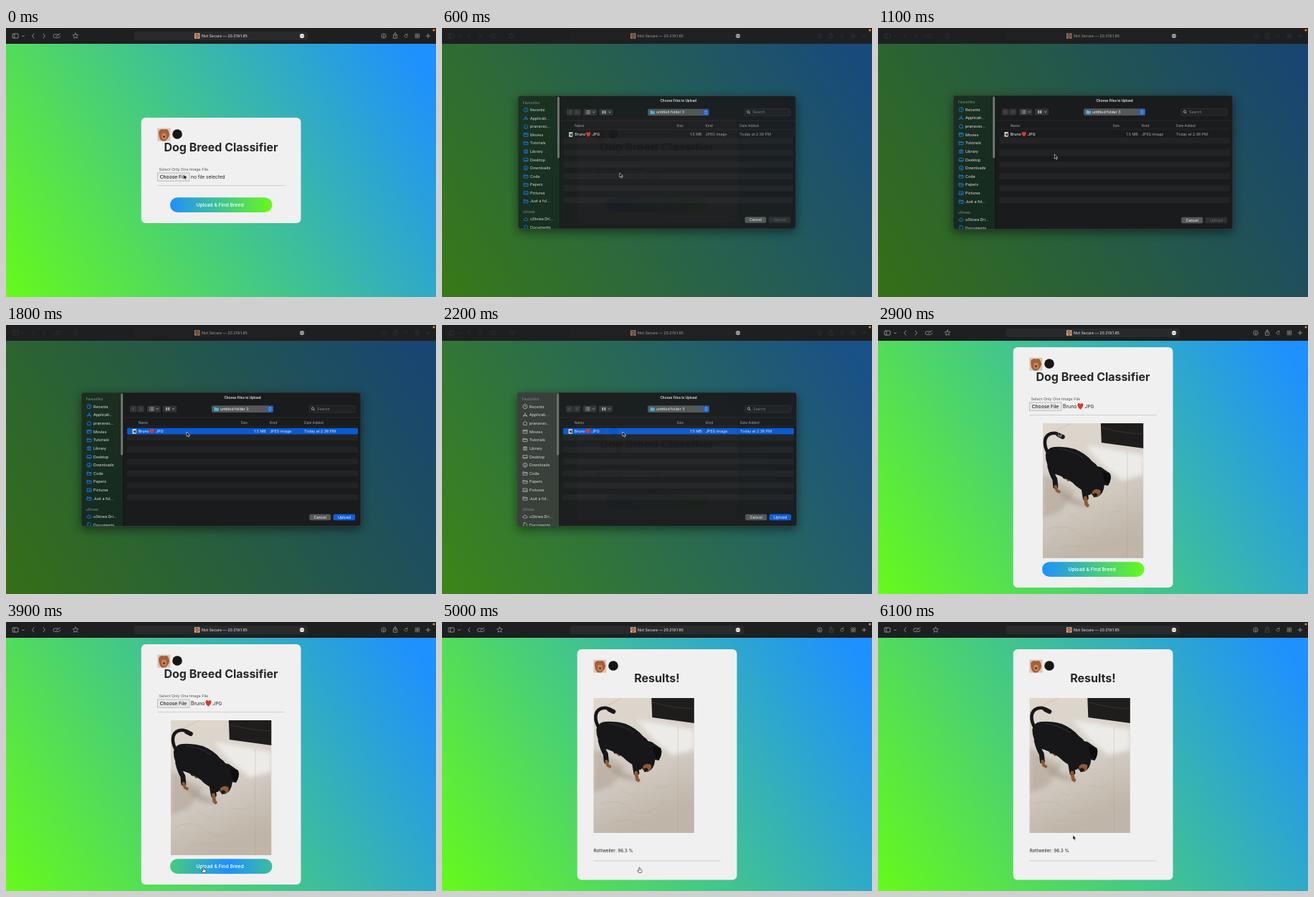
An HTML page that plays this animation: 600x375 px, repeating every 6200 ms.

```html
<!DOCTYPE html>
<html lang="en">
<head>
<meta charset="utf-8">
<title>Dog Breed Classifier</title>
<style>
html, body { margin: 0; width: 100%; height: 100%; overflow: hidden; background: #1e1f20; }
svg { display: block; width: 100vw; height: 100vh; }
text { font-family: Inter, "Open Sans", sans-serif; white-space: pre; }
</style>
</head>
<body>
<svg id="stage" viewBox="0 0 600 375"></svg>
<script>
const LOOP = 6200;
const BLUE = '#1e90ff', LIME = '#66fa1a', INK = '#262626';

const txt = (x, y, s, size, fill = '#fff', weight = 400, anchor = 'start') =>
  `<text x="${x}" y="${y}" font-size="${size}" fill="${fill}" font-weight="${weight}" text-anchor="${anchor}">${s}</text>`;
const box = (x, y, w, h, fill, r = 0, more = '') =>
  `<rect x="${x}" y="${y}" width="${w}" height="${h}" rx="${r}" fill="${fill}" ${more}/>`;
const line = (d, color, w = 0.8, more = '') =>
  `<path d="${d}" fill="none" stroke="${color}" stroke-width="${w}" stroke-linecap="round" stroke-linejoin="round" ${more}/>`;
const shape = (d, fill, more = '') => `<path d="${d}" fill="${fill}" ${more}/>`;
const heart = (x, y, k) =>
  shape('M0 4C-5 0-4-4-1.8-4Q-.4-4 0-2.6Q.4-4 1.8-4C4-4 5 0 0 4Z', '#d9392b', `transform="translate(${x} ${y}) scale(${k})"`);
const group = (id, inner, more = '') => `<g id="${id}" ${more}>${inner}</g>`;

// end points of a CSS-style angled gradient over the page area
function skyLine(deg) {
  const a = deg * Math.PI / 180, sx = Math.sin(a), sy = Math.cos(a), half = 300 * sx + 176.5 * sy;
  return `x1="${300 - sx * half}" y1="${198.5 + sy * half}" x2="${300 + sx * half}" y2="${198.5 - sy * half}"`;
}

const defs = `<defs>
  <linearGradient id="sky" gradientUnits="userSpaceOnUse" ${skyLine(58)}><stop stop-color="${LIME}"/><stop offset=".96" stop-color="${BLUE}"/></linearGradient>
  <linearGradient id="btn" gradientUnits="userSpaceOnUse" x1="229" x2="371" y1="0" y2="0" spreadMethod="reflect">
    <stop stop-color="${BLUE}"/><stop offset="1" stop-color="${LIME}"/></linearGradient>
  <linearGradient id="floor" x1="0" y1="0" x2=".3" y2="1">
    <stop stop-color="#dfd6ca"/><stop offset=".35" stop-color="#d9d4cc"/><stop offset=".65" stop-color="#d0c9c0"/><stop offset="1" stop-color="#bfb5a8"/></linearGradient>
  <linearGradient id="side" x1="0" y1="0" x2="0" y2="1"><stop stop-color="#1a2f20"/><stop offset="1" stop-color="#162b20"/></linearGradient>
  <filter id="soft" x="-30%" y="-30%" width="160%" height="160%"><feGaussianBlur stdDeviation="3"/></filter>
  <filter id="shade" x="-20%" y="-20%" width="140%" height="150%"><feGaussianBlur stdDeviation="7"/></filter>
  <clipPath id="frame"><rect width="140.5" height="188"/></clipPath>
  <clipPath id="sheet"><rect x="105" y="94" width="390" height="186.5" rx="4"/></clipPath>
  <g id="pup">${box(0, 0, 18, 18, '#d8c7b8')}${shape('M2 4Q5 0 9 2Q15 0 16 6Q18 11 14 15L11 18H6Q1 14 2 4Z', '#a65f38')}
    ${shape('M6 8Q9 6 12 8L13 14Q9 18 6 14Z', '#c68659')}<circle cx="9.3" cy="12" r="1.4" fill="#47291d"/></g>
  <g id="photo" clip-path="url(#frame)">${photo()}</g>
</defs>`;

function photo() {
  const tan = '#8f5a38', coat = '#17171a';
  return box(0, 0, 141, 188, 'url(#floor)')
    + shape('M0 70L45 95L26 122L0 132Z', '#a99a8a', 'opacity=".5" filter="url(#soft)"')
    + shape('M60 30L141 44V72L110 80L84 58Z', '#f1f0ee', 'opacity=".85" filter="url(#soft)"')
    + line('M0 20L40 0M118 40V188', '#a9a196', 0.6, 'opacity=".6"')
    + line('M8 148Q32 138 50 154T98 146M22 176Q52 164 74 178M84 122Q102 128 112 118M38 128L56 136', '#b0a79b', 0.6, 'opacity=".6"')
    + shape('M81 0H141V35L82 27Z', '#1f1c1c') + line('M83 6Q110 14 141 15', '#393433', 1)
    + shape('M18 92Q42 104 62 112L66 117L40 112Z', '#827567', 'opacity=".4" filter="url(#soft)"')
    + line('M8 42C1 31 1 18 11 14.5Q19 12 26 18', coat, 4.6) + line('M22 16L28 19', coat, 6)
    + line('M10 60Q13 72 17 78L18 88M25 64L31 74', coat, 7)
    + line('M18 88L20 94L23 95.5M32 75L36 79', tan, 4)
    + shape('M4 44Q6 34 16 33Q32 32 45 36Q60 42 69 53Q80 60 80 72Q74 88 62 97Q48 90 42 83Q30 74 14 70Q4 58 4 44Z', coat)
    + line('M57 86L60 104M67 84L64 96', coat, 8)
    + line('M59.5 104L61 113L62.5 114.5', tan, 4.8)
    + shape('M63 68Q70 58 81 61L94 70Q97 77 91 87L86 86Q85 99 76 103Q69 103 67 96Q60 82 63 68Z', coat)
    + shape('M69 95Q75 89 81 94Q81 102 75 103Q69 103 69 95Z', tan)
    + shape('M70 99Q74 95 77 100Q74 104 71 103Z', '#1e1718')
    + shape('M83 67L94 70Q97 78 91 87Q84 80 83 67Z', '#0d0d10')
    + line('M22 36Q40 37 56 48', '#303035', 1.4, 'opacity=".7"');
}

function browserBar() {
  const c = '#a6a6a8';
  const icons = box(9, 8, 8, 6, 'none', 1, `stroke="${c}" stroke-width=".8"`) + line('M11.8 8V14M22.5 10.5L24 12L25.5 10.5M39 8L36.5 11L39 14', c)
    + group('fwd', line('M52 8L54.5 11L52 14', c))
    + group('tools', line('M73 9H67.5Q66 9 66 11T67.5 13.5H73.5Q75 13.5 75.3 11M70 11.8L75.5 7.8', c, 0.7)
      + line('M97 7L98.1 9.5L100.8 9.8L98.8 11.6L99.4 14.3L97 12.9L94.6 14.3L95.2 11.6L93.2 9.8L95.9 9.5Z', c, 0.7))
    + `<circle cx="527" cy="11" r="3.2" fill="none" stroke="${c}" stroke-width=".7"/>` + line('M527 9.4V12.6M525.8 11.6L527 12.7L528.2 11.6', c, 0.6)
    + group('share', line('M542 9.5H540.5V14.3H545.7V9.5H544.3M543.1 12V6.8M541.6 8.2L543.1 6.8L544.6 8.2', c, 0.7))
    + line('M559.8 9.5A2.2 2.2 0 1 0 560.4 11.4M560 8V9.6H558.4', c, 0.6)
    + [[571, 8], [574.3, 8], [571, 11.3], [574.3, 11.3]].map(p => box(p[0], p[1], 2.5, 2.5, 'none', 0.4, `stroke="${c}" stroke-width=".6"`)).join('')
    + line('M586.3 11H591.7M589 8.3V13.7', c);
  return box(0, 0, 600, 22, '#1e1f20') + group('pill', box(179, 5, 242, 12, '#292a2c', 3))
    + group('icons', icons)
    + group('address', '<use href="#pup" transform="translate(263 7.3) scale(.41)"/>' + txt(273, 13.1, 'Not Secure — 20.219.1.85', 5.3, '#eee')
      + '<circle cx="413" cy="11" r="3.1" fill="#eee"/>' + line('M411.5 11H411.51M413 11H413.01M414.5 11H414.51', '#222', 0.9))
    + '<circle cx="597" cy="3" r="1.6" fill="#f08a24"/>';
}

function page() {
  const head = '<use href="#pup" x="211.3" y="139.6"/><circle cx="239" cy="148" r="6.8" fill="#161616"/>';
  const rule = y => line(`M211.5 ${y}H388.5`, '#b8b8b8', 0.6);
  const form = txt(213.5, 199.4, 'Select Only One Image File', 5.4, '#555')
    + box(211.5, 202, 44.5, 11.2, '#e9e9e9', 0, 'stroke="#a8a8a8" stroke-width=".7"')
    + txt(214.7, 209.8, 'Choose File', 6.7, '#222', 500)
    + group('none', txt(258, 209.8, 'no file selected', 6.6, '#222'))
    + group('picked', txt(258, 209.8, 'Bruno', 6.9, '#222') + heart(282.4, 207.3, 1.1) + txt(287, 209.8, '.JPG', 6.4, '#222'))
    + rule(219.6);
  return '<rect id="card" x="188.7" width="222.8" rx="6" fill="#f0f0f0"/>'
    + group('head', head + group('title', txt(300, 172, 'Dog Breed Classifier', 15.95, INK, 700, 'middle') + form)
      + group('results', txt(300, 171.3, 'Results!', 16, INK, 700, 'middle')))
    + '<use id="shot" href="#photo"/>'
    + group('button', box(229, 236.3, 142.4, 20.8, 'url(#btn)', 10.4) + txt(298.5, 249, 'Upload &amp; Find Breed', 6.8, '#fff', 500, 'middle'))
    + group('verdict', txt(211.5, 321, 'Rottweiler: 96.3 %', 6.4, '#222') + rule(333));
}

const glyphs = {
  clock: 'M3 0A3 3 0 1 1-3 0A3 3 0 1 1 3 0M0-1.7V0L1.3 .8',
  app: 'M-2.6 2.5L.3-2.7M-.3-2.7L2.6 2.5M-3 1H3',
  home: 'M-3 0L0-2.8L3 0M-2.2-.6V2.6H2.2V-.6',
  film: 'M-3-2.2H3V2.3H-3ZM-3-.7H3M-1-2.2L-1.6-.7M1-2.2L.4-.7',
  folder: 'M-3-2.1H-.8L-.1-1.4H3V2.3H-3ZM-3-.6H3',
  temple: 'M-3-1L0-2.8L3-1ZM-2-.8V2M0-.8V2M2-.8V2M-3 2.4H3',
  screen: 'M-3-2H3V2.2H-3ZM-3 1.2H3',
  down: 'M3 0A3 3 0 1 1-3 0A3 3 0 1 1 3 0M0-1.5V1.5M-1.2 .4L0 1.6L1.2 .4',
  photo: 'M-3-2.2H3V2.2H-3ZM-2.5 1.8L-.5-.4L.8 .8L1.6 0L2.7 1.8',
  cloud: 'M-1.8 2H2Q3.3 1.6 3 .3Q2.6-.7 1.5-.5Q1-2.4-.7-2Q-2-1.6-1.9-.3Q-3.3-.1-3.1 1Q-2.8 2-1.8 2Z',
  doc: 'M-2-2.9H.8L2.2-1.5V2.9H-2Z'
};

function dialog() {
  const places = [['clock', 'Recents'], ['app', 'Applicati...'], ['home', 'pranavso...'], ['film', 'Movies'], ['folder', 'Tutorials'],
    ['temple', 'Library'], ['screen', 'Desktop'], ['down', 'Downloads'], ['folder', 'Code'], ['folder', 'Papers'],
    ['photo', 'Pictures'], ['folder', 'Just a fol...']].map((p, i) => [...p, 113.7 + i * 11.65]);
  places.push(['cloud', 'uStowa Dri...', 267], ['doc', 'Documents', 278.6]);
  const marks = places.map(p => `<path transform="translate(116 ${p[2]})" d="${glyphs[p[0]]}"/>`).join('');
  const names = places.map(p => txt(122, p[2] + 1.9, p[1], 5.4, '#e6e6e6')).join('');
  const stripes = [...Array(6)].map((_, i) => box(169, 153 + i * 16.6, 322, 8.3, '#222325', 1.5)).join('');
  const grey = '#a6a6a8', pale = '#dcdcdc';
  const panel = box(105, 94, 390, 187, '#1a1b1d') + group('sideOn', box(105, 94, 58.5, 187, 'url(#side)'))
    + group('sideOff', box(105, 94, 58.5, 187, '#3a3e3c')) + line('M163.7 94V281', '#0d0f0e', 0.6)
    + txt(112, 105.3, 'Favourites', 4.7, '#7c857f', 500) + txt(112, 258.8, 'uStowa', 4.7, '#7c857f', 500)
    + group('marks', marks, 'fill="none" stroke-width=".8" stroke-linejoin="round"') + names
    + box(160.2, 95.5, 3, 86, '#727573', 1.5)
    + txt(330, 102.9, 'Choose Files to Upload', 4.6, '#eee', 600, 'middle')
    + box(173, 112.5, 9.5, 9, '#343537', 1.5) + box(183.3, 112.5, 9.7, 9, '#343537', 1.5)
    + line('M178.5 115.2L176.9 117L178.5 118.8M187.5 115.2L189.1 117L187.5 118.8', '#77787a', 0.7)
    + box(197, 112.5, 18.5, 9, '#343537', 1.5) + box(219, 112.5, 19, 9, '#343537', 1.5)
    + line('M200.5 115H200.6M200.5 117H200.6M200.5 119H200.6M202 115H206M202 117H206M202 119H206M210 116.5L211.2 117.7L212.4 116.5M232.5 116.5L233.7 117.7L234.9 116.5', pale, 0.7)
    + box(223, 114.8, 2.2, 4.4, grey) + box(226.2, 114.8, 2.2, 4.4, grey)
    + box(287, 112.3, 86, 9.6, '#55575a', 2)
    + shape('M290.5 114.7H293L293.7 115.5H296.8V119.7H290.5Z', '#46b9ea') + txt(299, 118.9, 'untitled folder 3', 5.3)
    + box(364.7, 113, 7.6, 8.2, '#1766d8', 1.6) + line('M367.2 116.2L368.5 114.9L369.8 116.2M367.2 118L368.5 119.3L369.8 118', '#fff', 0.7)
    + box(423, 112.3, 64, 9.6, '#202124', 2, 'stroke="#3b3c3e" stroke-width=".6"')
    + '<circle cx="428" cy="116.6" r="1.7" fill="none" stroke="#ccc" stroke-width=".7"/>' + line('M429.3 117.9L430.7 119.3', '#ccc', 0.7)
    + txt(434, 118.9, 'Search', 5.3, '#858688')
    + line('M164 129H495M169 141H491', '#303133', 0.6)
    + txt(184.7, 137.6, 'Name', 4.8, grey) + txt(337, 137.6, 'Size', 4.8, grey, 400, 'end') + txt(368, 137.6, 'Kind', 4.8, grey) + txt(416, 137.6, 'Date Added', 4.8, grey)
    + stripes + group('chosen', box(169, 143.8, 322, 8.7, '#0a5bd3', 1.5))
    + box(176.5, 145, 5.2, 6.6, '#e0ddd7') + shape('M177.5 147.5L181 146.4V150.5L178.5 150Z', '#4a423b')
    + txt(184.7, 150.2, 'Bruno', 5.4) + heart(203.7, 148.2, 0.85) + txt(207.8, 150.2, '.JPG', 5.3)
    + group('meta', txt(362.7, 150.2, '1.5 MB', 5.3, 'currentColor', 400, 'end')
      + txt(368, 150.2, 'JPEG image', 5.3, 'currentColor') + txt(416, 150.2, 'Today at 2:38 PM', 5.3, 'currentColor'))
    + box(423.3, 263.7, 30, 8.6, '#58595b', 2) + txt(438.3, 269.9, 'Cancel', 5.3, '#fff', 400, 'middle')
    + '<rect id="upBox" x="456.7" y="263.7" width="30.5" height="8.6" rx="2"/>'
    + '<text id="upText" x="472" y="269.9" font-size="5.3" text-anchor="middle">Upload</text>';
  return box(105, 98, 390, 187, '#000', 4, 'opacity=".5" filter="url(#shade)"')
    + `<g clip-path="url(#sheet)">${panel}</g>` + box(105, 94, 390, 186.5, 'none', 4, 'stroke="#4a4c4b" stroke-width=".5"');
}

const stage = document.getElementById('stage');
stage.innerHTML = defs + box(0, 22, 600, 353, 'url(#sky)') + page()
  + '<rect id="dim" y="22" width="600" height="353" fill="#151515"/>' + browserBar() + group('dialog', dialog())
  + group('arrow', shape('M0 0V6.2L1.5 4.9L2.5 7.2L3.7 6.7L2.7 4.5H4.6Z', '#000', 'stroke="#fff" stroke-width=".6"'))
  + group('hand', shape('M-.7 0Q0-.8 .7 0V2.3L3 3Q3.8 3.4 3.5 4.7L2.8 7H-1L-2.8 4.2Q-2.6 3.3-1.7 3.8L-.7 4.6Z', '#fff', 'stroke="#111" stroke-width=".6"'));

const el = id => document.getElementById(id);
const set = (id, attrs) => { for (const k in attrs) el(id).setAttribute(k, attrs[k]); };
const show = (id, on) => set(id, { display: on ? 'inline' : 'none' });
const ramp = (t, a, b) => Math.min(1, Math.max(0, (t - a) / (b - a)));
const ease = p => p * p * (3 - 2 * p);

// time, x, y of the pointer tip
const path = [[0, 248, 204.5], [500, 248, 204.5], [1050, 246.3, 176], [1300, 246.3, 176], [1700, 252, 149],
  [3000, 252, 149], [3650, 275.5, 342.5], [5250, 275.5, 342.5], [5900, 272, 297.3], [LOOP, 272, 297.3]];

function pointer(t) {
  const i = path.findIndex((p, n) => n && t <= p[0]);
  const a = path[i - 1], b = path[i], k = ease(ramp(t, a[0], b[0]));
  return [a[1] + (b[1] - a[1]) * k, a[2] + (b[2] - a[2]) * k];
}

function render(t) {
  const picked = t >= 2500, done = t >= 4600, chosen = t >= 1700, closing = t >= 2150;
  const opened = ease(ramp(t, 350, 650)), closed = ramp(t, 2150, 2480);
  const modal = t >= 400 && t < 2400;

  const lift = done ? 87 : picked ? 94 : 0;
  set('card', { y: 125 - lift, height: done ? 321.5 : 147 + 2 * lift });
  set('head', { transform: `translate(0 ${-lift})` });
  set('button', { transform: `translate(0 ${lift})` });
  set('shot', { transform: done ? 'translate(211.3 106)' : 'translate(229.8 137)' });
  set('btn', { gradientTransform: `translate(${142 * ease(ramp(t, 3600, 4150))} 0)` });
  show('title', !done);
  show('results', done);
  show('verdict', done);
  show('button', !done);
  show('none', !picked);
  show('picked', picked);
  show('shot', picked);

  show('fwd', !done);
  set('tools', { transform: `translate(${done ? -16.5 : 0} 0)` });
  set('share', { opacity: done ? 0.35 : 1 });
  set('icons', { opacity: modal ? 0.14 : 1 });
  set('pill', { opacity: modal ? 0.25 : 1 });
  set('address', { opacity: modal ? 0.62 : 1 });

  set('dim', { opacity: 0.6 * opened * (1 - closed) });
  const zoom = 0.92 + 0.08 * opened;
  set('dialog', { opacity: opened * (1 - closed ** 1.5), transform: `translate(300 187) scale(${zoom}) translate(-300 -187)` });
  show('dialog', opened > 0 && closed < 1);
  show('chosen', chosen);
  show('sideOn', !closing);
  show('sideOff', closing);
  set('marks', { stroke: closing ? '#b9bcba' : '#1684f0' });
  set('meta', { color: chosen ? '#e4ecfa' : '#a6a6a8' });
  set('upBox', { fill: chosen ? '#0f60dd' : '#2e2f31' });
  set('upText', { fill: chosen ? '#fff' : '#6c6d6f' });

  const [x, y] = pointer(t), hand = t >= 3600 && t < 5300;
  show('hand', hand);
  show('arrow', !hand);
  set(hand ? 'hand' : 'arrow', { transform: `translate(${x} ${y})` });
}

const start = performance.now();
function tick() {
  render((performance.now() - start) % LOOP);
  requestAnimationFrame(tick);
}
tick();
</script>
</body>
</html>
```
